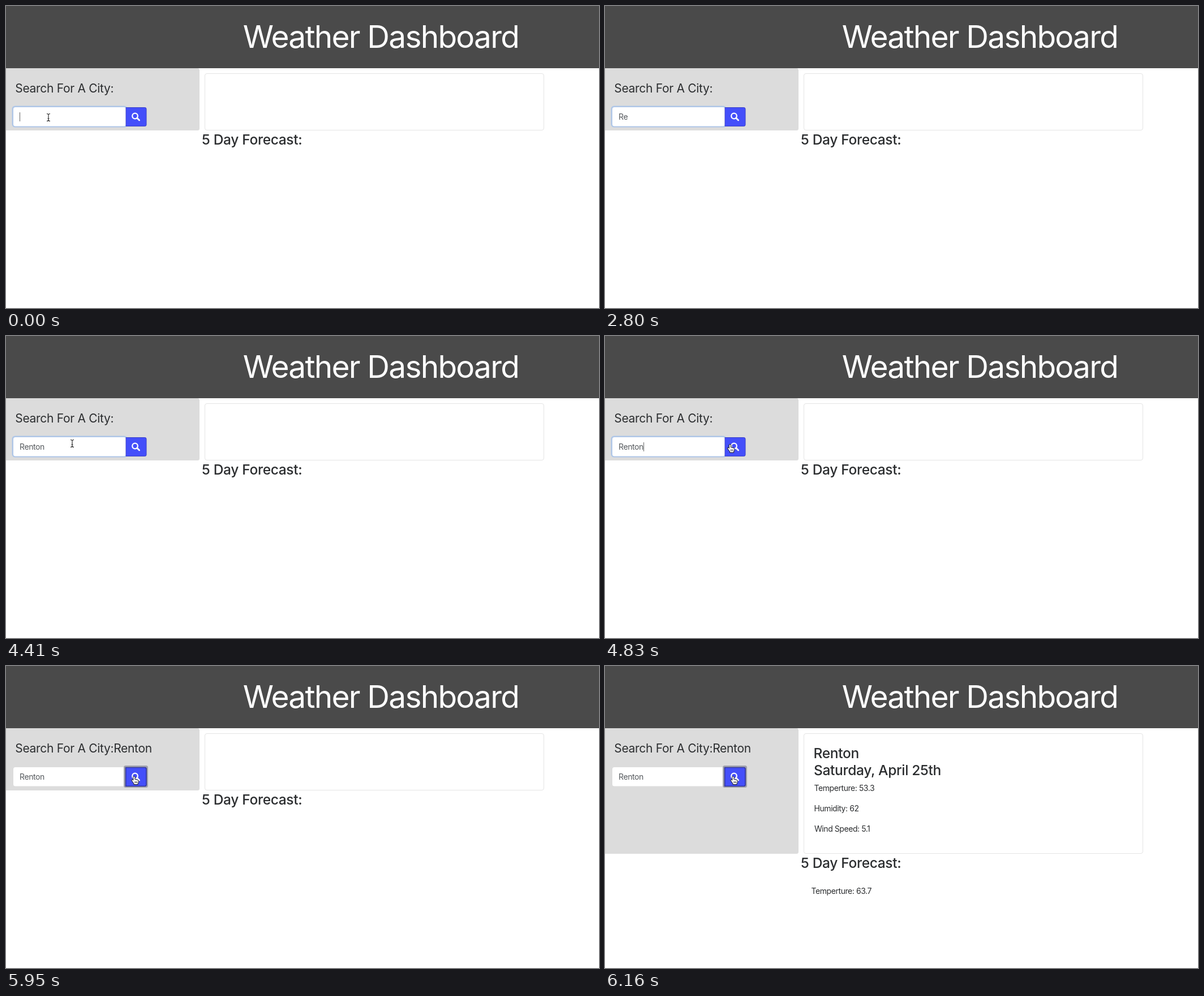
These frames come from a looping animation (1048x534 px, 6440 ms). An HTML page:

```html
<!DOCTYPE html>
<html lang="en">
<head>
<meta charset="utf-8">
<title>Weather Dashboard</title>
<style>
  html, body { margin: 0; height: 100%; overflow: hidden; background: #fff; }
  svg { display: block; width: 1048px; height: 534px; }
  text { font-family: Inter, Roboto, sans-serif; fill: #2b2d2f; white-space: pre; }
  .title { font-size: 55px; font-weight: 430; letter-spacing: -.032em; fill: #fff; text-anchor: middle; }
  .label { font-size: 21px; letter-spacing: -.015em; }
  .head { font-size: 24.5px; font-weight: 550; letter-spacing: -.013em; }
  .small { font-size: 14px; font-weight: 430; letter-spacing: -.031em; }
  .field { fill: #55595d; letter-spacing: -.028em; }
</style>
</head>
<body>
<svg viewBox="0 0 1048 534">
  <rect width="1048" height="110" fill="#4a4a4a"/>
  <text class="title" x="662.5" y="74">Weather Dashboard</text>

  <rect id="panel" x="-4" y="110" width="346" rx="3.5" fill="#dcdcdc"/>
  <rect id="card" x="351.5" y="119.5" width="599" rx="3.5" fill="#fff" stroke="#e4e4e4"/>
  <text class="label" id="label" x="16.3" y="152.7"></text>

  <rect id="inputRing" x="10.5" y="176.5" width="204" height="38" rx="5.5" fill="#b0c7e8"/>
  <rect x="13" y="179" width="199" height="33.5" rx="3.5" fill="#fff"/>
  <rect id="buttonRing" x="208" y="176" width="43" height="39" rx="3.5" fill="#a0a1ac"/>
  <path d="M212 179.5h33.5q2.500 0 2.500 2.500v28q0 2.500-2.500 2.500h-33.500z" fill="#444ffa" stroke="#3d43c8"/>
  <path id="buttonEdge" d="M211.5 179.500h34q2.500 0 2.500 2.500v28q0 2.500-2.500 2.500h-34z" fill="none" stroke="#35399c" stroke-width="1.600"/>
  <g fill="none" stroke="#fff">
    <circle cx="228" cy="194.500" r="4.800" stroke-width="2.200"/>
    <path d="M231.600 198.100l4 4" stroke-width="2.800" stroke-linecap="round"/>
  </g>

  <text class="small field" id="field" x="24" y="201"></text>
  <rect id="caret" y="188" width="1" height="16" fill="#666"/>

  <text class="head" id="forecast" x="346">5 Day Forecast:</text>
  <g id="today">
    <text class="head" x="368.500" y="162.500">Renton</text>
    <text class="head" x="369" y="192.500">Saturday, April 25th</text>
    <text class="small" x="369.500" y="221">Temperture: 53.3</text>
    <text class="small" x="369.500" y="257">Humidity: 62</text>
    <text class="small" x="370" y="293">Wind Speed: 5.1</text>
  </g>
  <text class="small" id="next" x="364.500" y="403">Temperture: 63.7</text>

  <path id="beam" d="M-3-6.500q3 0 3 2v9q0 2-3 2M3-6.500q-3 0-3 2v9q0 2 3 2M-1.500 2h3" fill="none" stroke="#222" stroke-width="1.100"/>
  <g id="hand" stroke="#111" stroke-linejoin="round">
    <path fill="#fff" d="M-.6 14v-1.800L-3.800 8Q-5.200 5.600-4 5.100-2.800 4.900-1.700 6.600V1Q-1.700-.5-.1-.5 1.500-.5 1.500 1V5Q3.600 4.400 4 5.500 6 5.100 6.200 6.300 7.800 6.100 7.800 7.700V9.500Q7.800 11 6.600 12.200V14z"/>
    <path d="M1.400 8.500v3M3.300 8.500v3M5.200 8.500v3" fill="none" stroke-width=".8"/>
  </g>
</svg>
<script>
const LOOP = 6440, STEP = 70;
const $ = id => document.getElementById(id);
const set = (id, name, value) => $(id).setAttribute(name, value);
const show = (id, on) => set(id, "visibility", on ? "visible" : "hidden");
const clamp = v => Math.max(0, Math.min(1, v));

const city = "Renton";
const keyTimes = [1960, 2240, 2940, 3220, 3360, 3570];
const caretX = [24, 33, 41, 49, 54, 60, 68];
const caretOn = [[0, 210], [770, 1260], [1820, 2800], [2940, 4130], [4690, 5180]];

// Pointer path: time, x, y
const path = [
  [4200, 75, 197], [4340, 86, 194], [4480, 148, 186], [4550, 188, 184],
  [4620, 221, 187], [4690, 235, 190], [4830, 221, 192], [4900, 221, 192],
  [5040, 226.5, 195.5]
];

function pointer(t) {
  if (t <= path[0][0]) return path[0].slice(1);
  const i = path.findIndex(p => p[0] > t);
  if (i < 0) return path[path.length - 1].slice(1);
  const [t0, x0, y0] = path[i - 1], [t1, x1, y1] = path[i];
  const k = (t - t0) / (t1 - t0);
  return [x0 + (x1 - x0) * k, y0 + (y1 - y0) * k];
}

function draw(t) {
  const typed = keyTimes.filter(k => t >= k).length;
  $("field").textContent = city.slice(0, typed);
  set("caret", "x", caretX[typed]);
  show("caret", caretOn.some(([a, b]) => t >= a && t < b));

  const blur = clamp((t - 5320) / 210);
  set("inputRing", "opacity", 1 - blur);
  set("buttonRing", "opacity", blur);
  set("buttonEdge", "opacity", blur);
  $("label").textContent = "Search For A City:" + (t >= 5600 ? city : "");

  const loaded = t >= 6090, grow = loaded ? 112 : 0;
  set("panel", "height", 110 + grow);
  set("card", "height", 100 + grow);
  set("forecast", "y", 244.7 + grow);
  show("today", loaded);
  show("next", t >= 6160);

  const [x, y] = pointer(t), overButton = x > 211;
  const moved = `translate(${x} ${y})`;
  set("beam", "transform", moved);
  set("hand", "transform", moved);
  show("beam", !overButton && (t < 1960 || t >= 4270));
  show("hand", overButton);
}

const start = performance.now();
function tick() {
  const t = (performance.now() - start) % LOOP;
  draw(Math.floor(t / STEP) * STEP);
  requestAnimationFrame(tick);
}
tick();
</script>
</body>
</html>
```
